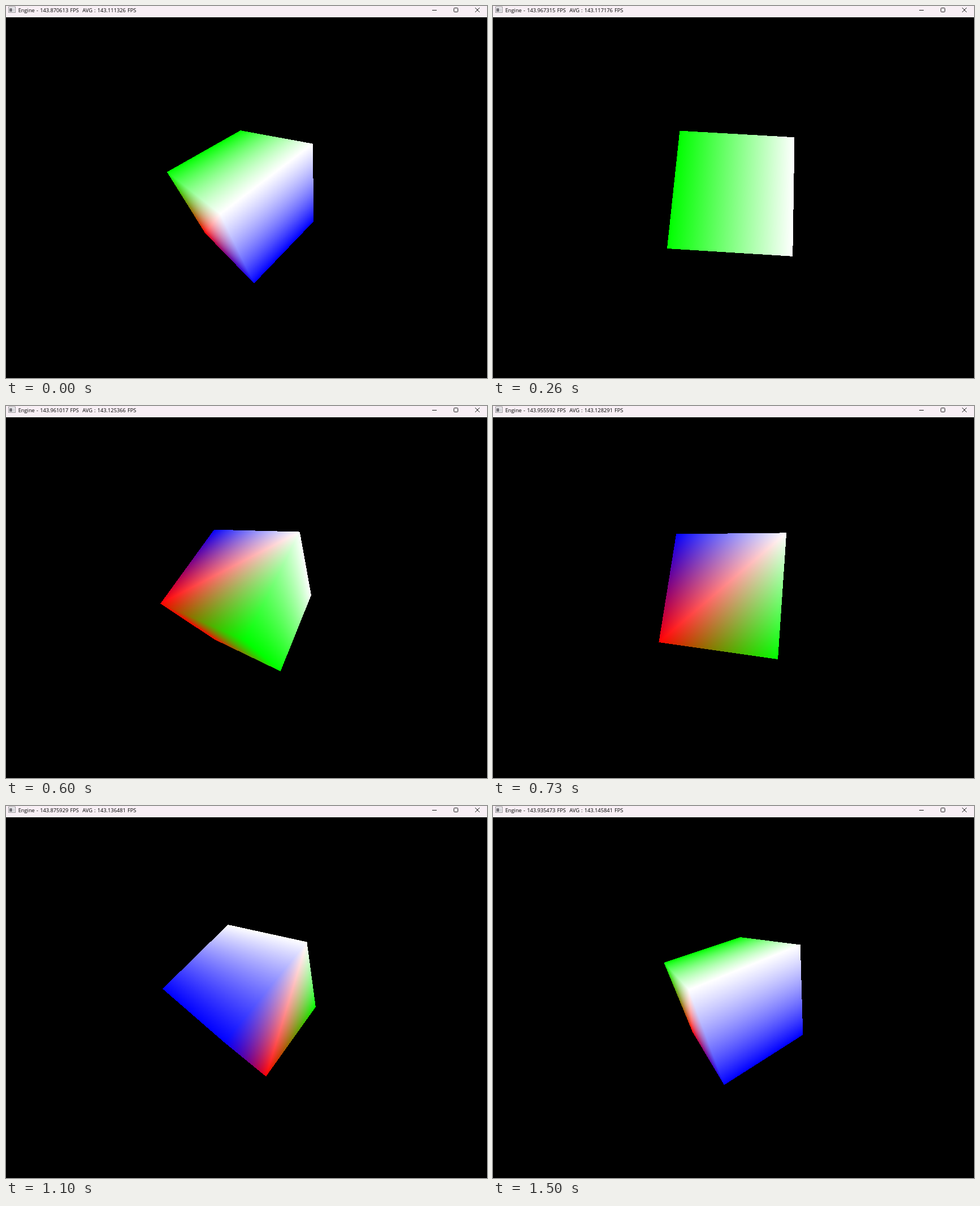
Recreate the animation shown at these times as an HTML page with a canvas. Size 851 by 658 pixels, loop 1530 ms.

```html
<!DOCTYPE html>
<html lang="en">
<head>
<meta charset="utf-8">
<title>Spinning cube</title>
<style>
  html, body { margin: 0; width: 100%; height: 100%; overflow: hidden; background: #000; }
  svg, canvas { position: absolute; display: block; }
  svg { left: 0; top: 0; }
  #title { font: 9.25px "Open Sans", "Noto Sans", sans-serif; word-spacing: 0.8px; white-space: pre; fill: #000; }
</style>
</head>
<body>
<svg width="851" height="658" viewBox="0 0 851 658">
  <rect width="851" height="658" fill="#000"/>
  <rect width="851" height="20" fill="#f8eff5"/>
  <g>
    <rect x="4.5" y="1.5" width="12" height="10" fill="#f4f4f6" stroke="#9a979c"/>
    <rect x="6" y="4" width="5" height="6" fill="#77757c"/>
    <rect x="12" y="4" width="3" height="6" fill="#d4d2d8"/>
  </g>
  <text id="title" x="21.7" y="11"></text>
  <g fill="none" stroke="#1a1a1a">
    <path d="M754 7.5H762"/>
    <rect x="792.5" y="3.5" width="7" height="7" rx="1"/>
    <path d="M830 3L838 11M838 3L830 11"/>
  </g>
</svg>
<canvas id="view"></canvas>
<script>
const LOOP = 1530, LAST_TICK = 59;
const BOX = { x: 265, y: 180, size: 325 };
const CENTER = { x: 425.5, y: 340.9 };
const FOCAL = 320, DISTANCE = 4;
const START = -65.2, STEP = 5.855;          // degrees, per tick
const SPIN = [1, 1, 1];
const TILT = [-0.071, 0.060, 0.011];        // fixed lean of the cube

const title = document.getElementById('title');
const view = document.getElementById('view');
view.width = view.height = BOX.size;
view.style.left = BOX.x + 'px';
view.style.top = BOX.y + 'px';
const ctx = view.getContext('2d');
const image = ctx.createImageData(BOX.size, BOX.size);

const dot = (a, b) => a[0] * b[0] + a[1] * b[1] + a[2] * b[2];
const cross = (a, b) => [a[1] * b[2] - a[2] * b[1], a[2] * b[0] - a[0] * b[2], a[0] * b[1] - a[1] * b[0]];

// Rodrigues rotation of v around an axis of any length
function turn(v, axis, angle) {
  const n = axis.map(c => c / Math.hypot(...axis));
  const c = Math.cos(angle), s = Math.sin(angle);
  const side = cross(n, v), along = dot(n, v) * (1 - c);
  return v.map((p, i) => p * c + side[i] * s + n[i] * along);
}

function noise(n) {
  const s = Math.sin(n * 127.1 + 3.7) * 43758.5453;
  return s - Math.floor(s);
}

// Casts one ray per pixel at the cube and colours the hit by its place
function drawCube(angle) {
  const axes = [[1, 0, 0], [0, 1, 0], [0, 0, 1]]
    .map(e => turn(turn(e, TILT, Math.hypot(...TILT)), SPIN, angle));
  const eye = axes.map(a => a[2] * DISTANCE);
  const ray = [0, 0, 0], data = image.data;
  let p = 0;
  for (let j = 0; j < BOX.size; j++) {
    const y = (CENTER.y - BOX.y - j - 0.5) / FOCAL;
    for (let i = 0; i < BOX.size; i++, p += 4) {
      const x = (BOX.x + i + 0.5 - CENTER.x) / FOCAL;
      let near = -Infinity, far = Infinity;
      for (let k = 0; k < 3; k++) {
        const a = axes[k], d = a[0] * x + a[1] * y - a[2];
        const t0 = (-1 - eye[k]) / d, t1 = (1 - eye[k]) / d;
        ray[k] = d;
        near = Math.max(near, Math.min(t0, t1));
        far = Math.min(far, Math.max(t0, t1));
      }
      let r = 0, g = 0, b = 0;
      if (near <= far) {
        b = (1 + eye[0] + ray[0] * near) / 2;
        g = (1 + eye[2] + ray[2] * near) / 2;
        r = 1 - Math.abs(b - g);
      }
      data[p] = r * 255;
      data[p + 1] = g * 255;
      data[p + 2] = b * 255;
      data[p + 3] = 255;
    }
  }
  ctx.putImageData(image, 0, 0);
}

function drawTitle(tick) {
  const rate = 143.8 + noise(tick) * 0.5;
  const average = 143.111326 + tick * 0.000585;
  title.textContent = `Engine - ${rate.toFixed(6)} FPS  AVG : ${average.toFixed(6)} FPS`;
}

// The picture steps about every 25 ms, on a 10 ms clock
function tickAt(ms) {
  const clock = Math.floor(ms % LOOP / 10) * 10;
  return Math.min(LAST_TICK, Math.floor(clock / 25.2 + 0.2));
}

let shown = -1;
function render(ms) {
  const tick = tickAt(ms);
  if (tick === shown) return;
  shown = tick;
  drawCube((START + STEP * tick) * Math.PI / 180);
  drawTitle(tick);
}

const begin = performance.now();
function loop() {
  render(performance.now() - begin);
  requestAnimationFrame(loop);
}
loop();
</script>
</body>
</html>
```
